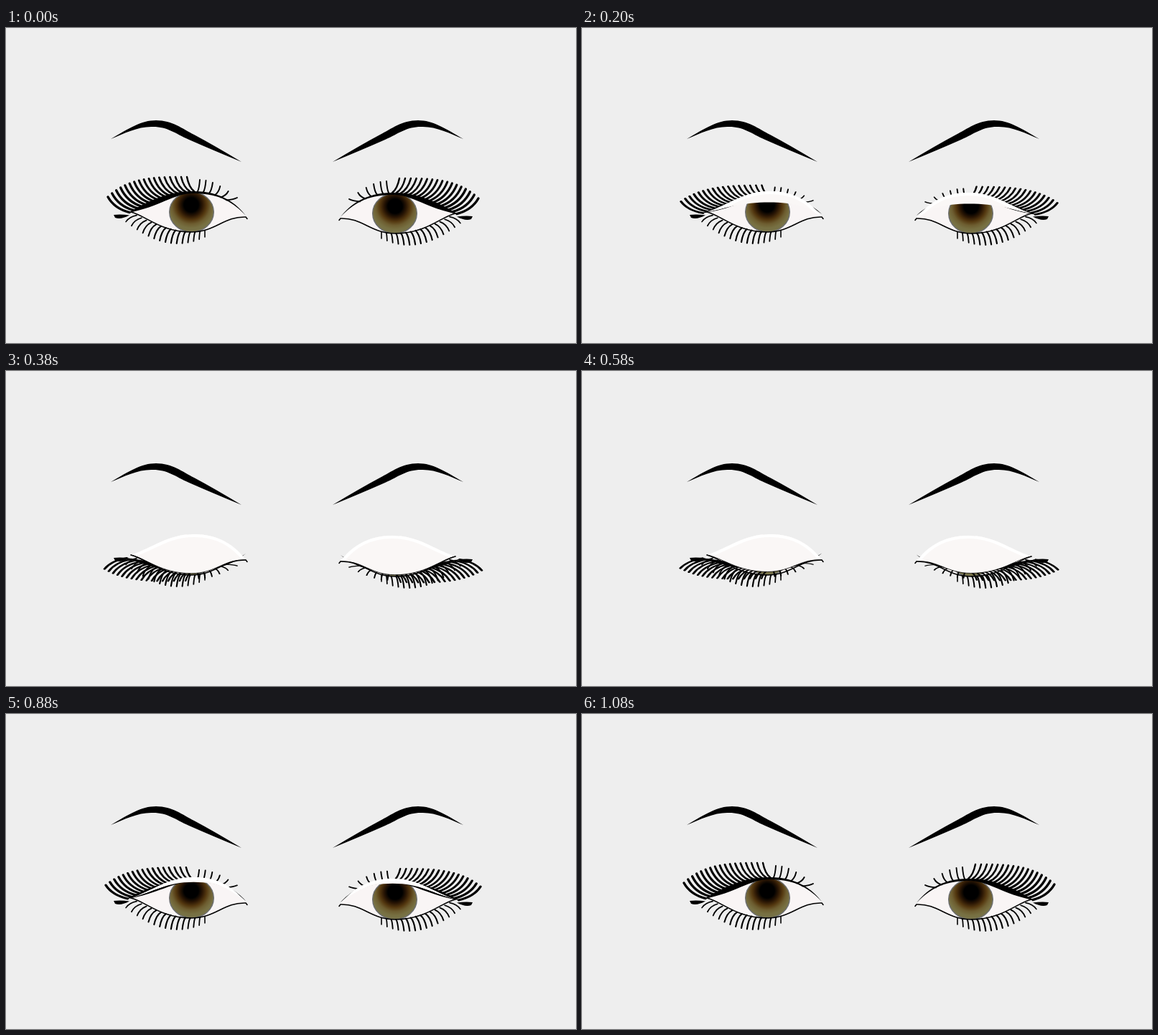
Animation of 794 by 440 pixels, one loop 2.54 s. Source, as an HTML page with a canvas:

```html
<!DOCTYPE html>
<html lang="en">
<head>
<meta charset="utf-8">
<title>Blinking eyes</title>
<style>
html, body { margin: 0; width: 794px; height: 440px; overflow: hidden; background: #eee }
canvas { display: block }
</style>
</head>
<body>
<canvas id="stage" width="794" height="440"></canvas>
<script>
const g = document.getElementById('stage').getContext('2d');
const LOOP = 2540;

// lid: 0 open .. 1 shut; lift: 1 lashes up .. -1 lashes down
const POSES = [
  { start: 0, lid: 0, lift: 1 },
  { start: 200, lid: .27, lift: .77 },
  { start: 290, lid: .42, lift: .35 },
  { start: 380, lid: .96, lift: -.68 },
  { start: 580, lid: .92, lift: -.62 },
  { start: 780, lid: .55, lift: .18 },
  { start: 880, lid: .12, lift: .88 },
  { start: 1080, lid: 0, lift: 1 }
];

const BROW = new Path2D(`M146 155 C172 140 188 129 209 129 C232 129 246 141 262 149
  Q290 164 328 187 Q289 171 255 156 C235 147 225 138 205 138 C185 137 165 147 146 155Z`);
const LINER = new Path2D(`M170 258 C190 247 222 227 262 228 C300 228 322 246 334 262
  C318 245 298 231 262 231 C232 231 215 250 170 258Z`);
const CORNER = new Path2D('M150 261 Q160 260 172 261.5 Q160 268 152 265Z');

// Lid rims, each two Bezier pieces from the outer to the inner corner
const UPPER = [174, 257, 205, 247, 225, 228, 262, 228, 298, 228, 320, 245, 334, 264];
const LOWER = [174, 257, 195, 262, 215, 285, 258, 285, 292, 285, 303, 263, 334, 264];

const mix = (a, b, t) => a + (b - a) * t;
const topY = x => 228 + (x < 262 ? 28 * ((262 - x) / 87) ** 1.6 : 30 * ((x - 262) / 70) ** 2);
const lowY = x => 285 - 28 * (Math.abs(258 - x) / 84) ** 1.8;

function curve(p) {
  const [a, b, ...c] = p;
  return `M${a} ${b} C${c.slice(0, 6)} C${c.slice(6)}`;
}

// Closed shape between two rims
function between(top, bottom) {
  const back = [];
  for (let i = bottom.length; i > 0; i -= 2) back.push(bottom[i - 2], bottom[i - 1]);
  return new Path2D(`${curve(top)} L${curve(back).slice(1)}Z`);
}

const EYE = between(UPPER, LOWER);
const LOW_LINE = new Path2D(`${curve(LOWER)} L336 266.5`);
const IRIS = new Path2D();
IRIS.ellipse(258.5, 257, 30.8, 28, 0, 0, 7);

const irisFill = g.createRadialGradient(258, 247, 10, 258, 247, 38);
['#000', '#2a1604', '#53370f', '#6d5d30', '#777042', '#77734a']
  .forEach((color, i, all) => irisFill.addColorStop(i / (all.length - 1), color));

function stroke(path, width, color = '#000') {
  g.lineWidth = width;
  g.strokeStyle = color;
  g.stroke(path);
}

function fill(path, color) {
  g.fillStyle = color;
  g.fill(path);
}

function clipped(shape, draw) {
  g.save();
  g.clip(shape);
  draw();
  g.restore();
}

// Runs out sideways first, then curls towards the tip
function lash(x, y, tipX, tipY, width) {
  const p = new Path2D();
  p.moveTo(x, y);
  p.quadraticCurveTo(mix(x, tipX, .7), mix(y, tipY, .25), tipX, tipY);
  stroke(p, width);
}

function spread(count, draw) {
  for (let i = 0; i < count; i++) draw(i / (count - 1));
}

function drawLowLashes() {
  spread(15, u => {
    const x = mix(182, 277, u), y = lowY(x), bulge = Math.sin(Math.PI * u);
    lash(x, y, x - 15 * (1 - u), y + 9 + 9 * bulge, 1.6 + .6 * bulge);
  });
  fill(CORNER, '#000');
}

function drawTopLashes(lift) {
  const flat = Math.sqrt(1 - lift * lift);
  const skew = -.07 * flat ** 4;
  g.save();
  g.translate(325, 259 + 95 * skew);
  g.transform(1 + .035 * flat, skew, 0, lift, 0, 0);
  g.translate(-325, -259);
  fill(LINER, '#000');
  spread(17, u => {
    const x = mix(172, 262, u);
    lash(x, topY(x), x - 30 + 20 * u * u, 208 + 28 * (1 - u) ** 3, mix(3.4, 2.4, u));
  });
  spread(6, u => {
    const x = mix(267, 307, u);
    lash(x, topY(x), x + mix(3, 15, u * u), mix(212, 237, u * u), 1.9);
  });
  g.restore();
}

function drawLid(lid) {
  const rim = UPPER.map((v, i) => mix(v, LOWER[i], lid));
  const shape = between(UPPER, rim);
  fill(shape, '#faf7f6');
  clipped(shape, () => stroke(new Path2D(curve(UPPER)), 8, '#fff'));
  if (lid > .3) stroke(new Path2D(curve(rim)), .8);
}

function drawEye({ lid, lift }) {
  fill(EYE, '#f9f5f5');
  clipped(EYE, () => {
    fill(IRIS, irisFill);
    stroke(IRIS, 1.4, '#6c6e70');
  });
  drawLowLashes();
  drawTopLashes(lift);
  if (lid) drawLid(lid);
  stroke(LOW_LINE, 1.6);
}

function mirrored(axis, dy, draw) {
  draw();
  g.save();
  g.transform(-1, 0, 0, 1, axis, dy);
  draw();
  g.restore();
}

function frame(now) {
  const pose = POSES.findLast(p => now % LOOP >= p.start);
  g.fillStyle = '#eee';
  g.fillRect(0, 0, 794, 440);
  g.lineCap = 'round';
  mirrored(783, 0, () => fill(BROW, '#000'));
  mirrored(800, 2, () => drawEye(pose));
}

let begin;
function tick(now) {
  begin ??= now;
  frame(now - begin);
  requestAnimationFrame(tick);
}
frame(0);
requestAnimationFrame(tick);
</script>
</body>
</html>
```
